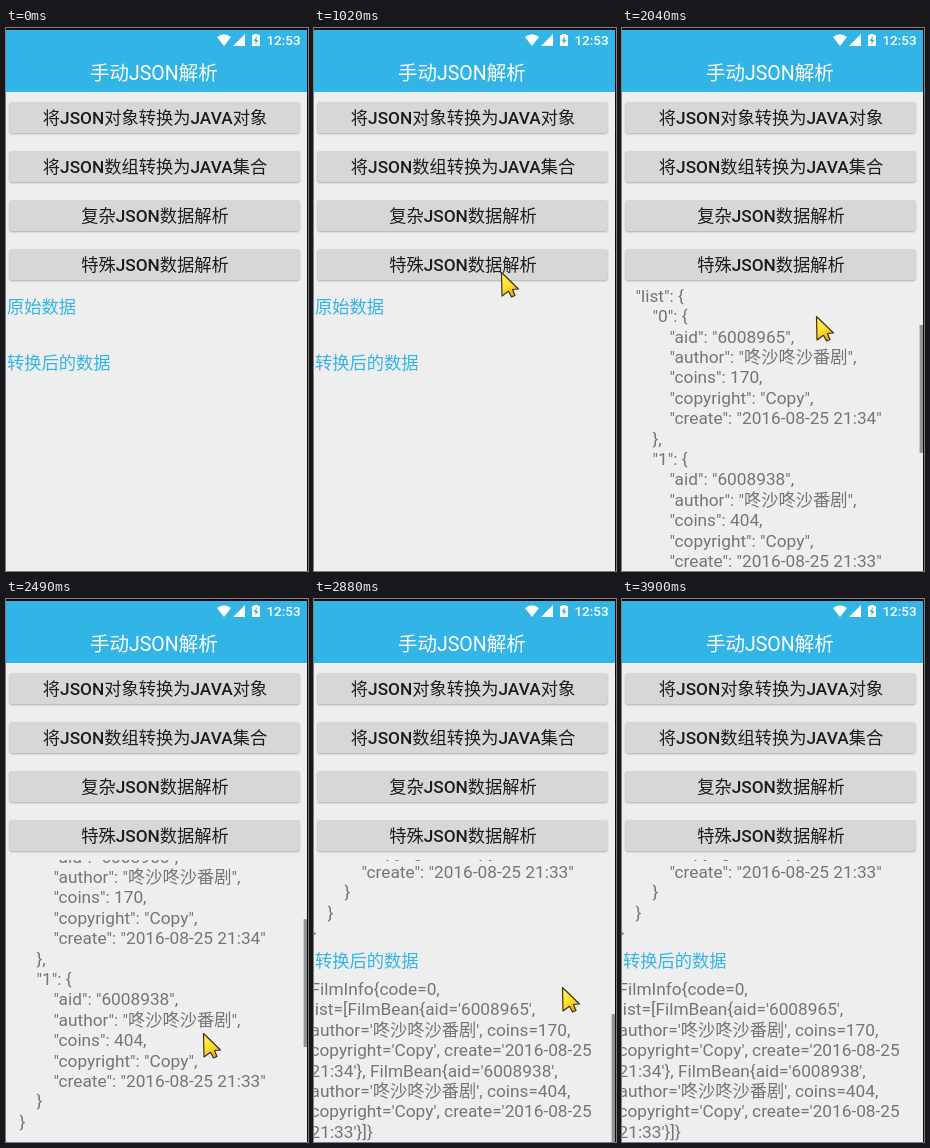
These frames come from a looping animation (302 px wide and 543 px high, 4.23 s). An HTML page with a canvas:

```html
<!DOCTYPE html>
<html lang="zh-CN">
<head>
<meta charset="utf-8">
<title>手动JSON解析</title>
<style>
html, body { margin: 0; width: 100%; height: 100%; overflow: hidden; background: #eee; }
canvas { display: block; width: 302px; height: 543px; }
</style>
</head>
<body>
<canvas id="stage" width="302" height="543"></canvas>
<script>
const W = 302, H = 543, LOOP = 4230, STEP = 30;
const ctx = document.getElementById('stage').getContext('2d');
const FONT = 'Roboto, "Noto Sans CJK SC", "Noto Sans CJK", sans-serif';
const BLUE = '#33b4e6', GREY = '#757575', PAGE = '#eeeeee', BLACK = '#0a0a0a';
const SIZE = 17.25, LINE = 20.4, INDENT = 17, LEFT = -3.5;
const VIEW_TOP = 261, VIEW_H = H - VIEW_TOP, MAX_SCROLL = 340;
const SHOW = 180, HIDE = 3630, LOADED = 1140;

const buttons = ['将JSON对象转换为JAVA对象', '将JSON数组转换为JAVA集合', '复杂JSON数据解析', '特殊JSON数据解析'];
const author = '咚沙咚沙番剧';
const films = [
  { aid: '6008965', author, coins: 170, copyright: 'Copy', create: '2016-08-25 21:34' },
  { aid: '6008938', author, coins: 404, copyright: 'Copy', create: '2016-08-25 21:33' }
];
const json = JSON.stringify({ code: 0, list: { ...films } }, null, 1).split('\n');
const parsed = [
  'FilmInfo{code=0,',
  "list=[FilmBean{aid='6008965',",
  `author='${author}', coins=170,`,
  "copyright='Copy', create='2016-08-25",
  "21:34'}, FilmBean{aid='6008938',",
  `author='${author}', coins=404,`,
  "copyright='Copy', create='2016-08-25",
  "21:33'}]}"
];

// Each move eases the pointer from where it is: start, end, x, y
const moves = [
  [180, 690, 209, 253],
  [690, 870, 187, 244],
  [1440, 1950, 166, 405],
  [1980, 2070, 198, 273],
  [2070, 2490, 197, 434],
  [2520, 2730, 249, 276],
  [2730, 3030, 248, 425],
  [3120, 3300, 257, 264],
  [3300, HIDE, 302, 220]
];

const ramp = (t, from, to) => Math.min(1, Math.max(0, (t - from) / (to - from)));
const easeOut = p => 1 - (1 - p) ** 2;

function pointer(t) {
  let x = 291, y = 79;
  for (const [from, to, tx, ty] of moves) {
    const p = easeOut(ramp(t, from, to));
    x += (tx - x) * p;
    y += (ty - y) * p;
  }
  return [x, y];
}

// Two flings: the second one runs to the end of the page
function scrollAt(t) {
  const first = 130.5;
  return first * easeOut(ramp(t, 1980, 2140)) +
    (MAX_SCROLL - first) * easeOut(ramp(t, 2550, 2810));
}

function box(x, y, w, h, color) {
  ctx.fillStyle = color;
  ctx.fillRect(x, y, w, h);
}

function poly(points, color) {
  ctx.beginPath();
  points.forEach(([x, y]) => ctx.lineTo(x, y));
  ctx.closePath();
  ctx.fillStyle = color;
  ctx.fill();
}

// y is the visual middle of the line
function text(str, x, y, color, size = SIZE, weight = 400, align = 'left') {
  ctx.font = `${weight} ${size}px ${FONT}`;
  ctx.textAlign = align;
  ctx.fillStyle = color;
  ctx.fillText(str, x, Math.round(y + size * 0.35));
}

function header() {
  box(0, 0, W, 64, BLUE);
  ctx.beginPath();
  ctx.moveTo(218, 18);
  ctx.lineTo(211, 9);
  ctx.quadraticCurveTo(218, 3.5, 225, 9);
  ctx.fillStyle = '#fff';
  ctx.fill();
  poly([[239, 6], [239, 18], [227, 18]], '#fff');
  box(246, 7, 8, 11, '#fff');
  box(248, 6, 4, 1, '#fff');
  poly([[251, 8], [247.5, 13], [249.6, 13], [249.2, 16.5], [252.5, 12], [250.4, 12]], BLUE);
  text('12:53', 294.7, 12.5, '#fff', 13.5, 500, 'right');
  text('手动JSON解析', 147.8, 45, '#fff', 19.5, 400, 'center');
}

function button(label, i, press) {
  const y = 74 + i * 49;
  ctx.save();
  ctx.shadowColor = `rgba(0,0,0,${0.27 + press * 0.15})`;
  ctx.shadowBlur = 2 + press * 2;
  ctx.shadowOffsetY = 1;
  ctx.fillStyle = '#d6d7d7';
  ctx.beginPath();
  ctx.roundRect(3.5, y, 290, 31, 2);
  ctx.fill();
  ctx.restore();
  if (press) {
    ctx.fillStyle = `rgba(0,0,0,${press * 0.12})`;
    ctx.fill();
  }
  text(label, 149, y + 16, '#1c1c1c', SIZE, 500, 'center');
}

function content(t, scroll) {
  const loaded = t >= LOADED;
  const rows = loaded ? json.length : 1;
  ctx.save();
  ctx.beginPath();
  ctx.rect(0, VIEW_TOP, W, VIEW_H);
  ctx.clip();
  ctx.translate(0, -Math.round(scroll));
  text('原始数据', 1, 279, BLUE);
  text('转换后的数据', 1, 335 + (rows - 1) * LINE, BLUE);
  if (loaded) {
    json.forEach((row, i) => {
      const str = row.trimStart();
      text(str, LEFT + (row.length - str.length) * INDENT, 307 + i * LINE, GREY);
    });
    parsed.forEach((row, i) => text(row, LEFT, 730 + i * LINE, GREY));
  }
  ctx.restore();
}

function scrollbar(scroll, alpha) {
  const ratio = VIEW_H / (VIEW_H + MAX_SCROLL);
  box(297.6, VIEW_TOP + scroll * ratio, 3.4, VIEW_H * ratio, `rgba(0,0,0,${alpha * 0.38})`);
}

function glow(level) {
  const peak = 40 * level, edge = peak * 0.6;
  ctx.beginPath();
  ctx.moveTo(0, H);
  ctx.lineTo(0, H - edge);
  ctx.quadraticCurveTo(W / 2, H - 2 * peak + edge, W, H - edge);
  ctx.lineTo(W, H);
  ctx.fillStyle = `rgba(63,81,181,${0.2 * level})`;
  ctx.fill();
}

function cursor(x, y) {
  ctx.save();
  ctx.translate(Math.round(x) + 0.5, Math.round(y) + 0.5);
  const fill = ctx.createLinearGradient(2, 4, 14, 22);
  fill.addColorStop(0, '#fff04a');
  fill.addColorStop(0.5, '#ffdf30');
  fill.addColorStop(1, '#e3a00c');
  poly([[0, 0], [17, 16.5], [11, 17], [13.5, 23], [10, 24.5], [7, 18.8], [0.5, 23.5]], fill);
  ctx.strokeStyle = '#40301c';
  ctx.lineWidth = 1.2;
  ctx.lineJoin = 'round';
  ctx.stroke();
  ctx.restore();
}

function draw(t) {
  const scroll = scrollAt(t);
  const press = Math.sin(Math.PI * ramp(t, 1080, 1260));
  const bar = ramp(t, 1980, 2010) * (1 - ramp(t, 3660, 3900));
  const level = easeOut(ramp(t, 3120, 3210)) * (1 - ramp(t, 3300, 3900));
  box(0, 0, W, H, PAGE);
  content(t, scroll);
  header();
  buttons.forEach((label, i) => button(label, i, i === 3 ? press : 0));
  if (bar) scrollbar(scroll, bar);
  if (level) glow(level);
  if (t >= SHOW && t < HIDE) cursor(...pointer(t));
  box(0, 0, W, 2, BLACK);
  box(301, 0, 1, H, BLACK);
}

const start = performance.now();
function tick() {
  const t = (performance.now() - start) % LOOP;
  draw(Math.floor(t / STEP) * STEP);
  requestAnimationFrame(tick);
}
tick();
</script>
</body>
</html>
```
